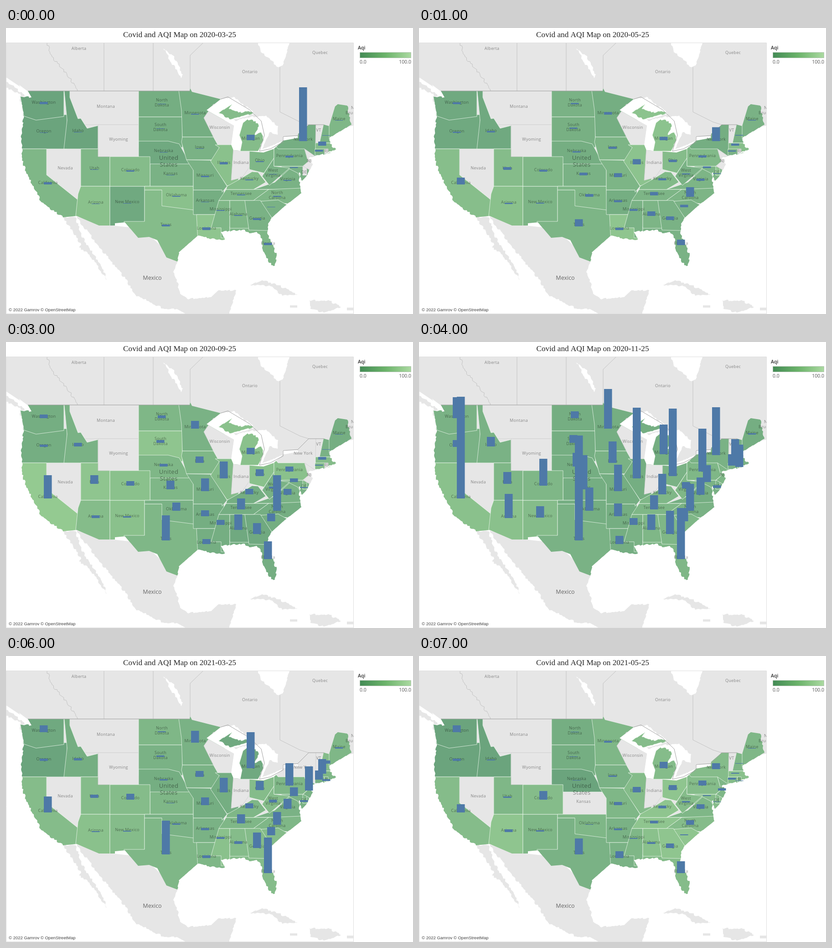
Write an HTML page with a canvas that moves like this. It is 893x627 px and loops after 8 s.

```html
<!DOCTYPE html>
<html lang="en">
<head>
<meta charset="utf-8">
<title>Covid and AQI Map</title>
<style>
html, body { margin: 0; width: 100%; height: 100%; overflow: hidden; background: #fff; }
canvas { display: block; }
</style>
</head>
<body>
<canvas id="stage" width="893" height="627"></canvas>
<script>
const ctx = document.getElementById('stage').getContext('2d');
const SANS = '"Open Sans", sans-serif', LAND = '#e6e6e6', INK = 'rgba(0,0,0,.42)';

const line = points => new Path2D('M' + points);
const area = points => new Path2D('M' + points + 'z');
const box = corners => {
  const [l, t, r, b] = corners.split(' ');
  return new Path2D(`M${l} ${t}H${r}V${b}H${l}z`);
};

// Adds small seeded bends between the given points of a coast.
function rough(points) {
  const p = points.split(' ').map(Number), out = [];
  for (let i = 0; i + 3 < p.length; i += 2) {
    const dx = p[i + 2] - p[i], dy = p[i + 3] - p[i + 1];
    const parts = Math.ceil(Math.hypot(dx, dy) / 4);
    for (let k = 0; k < parts; k++) {
      const bend = k && 1.5 * Math.sin(p[i] * 7 + p[i + 1] * 3 + k * k * 5);
      out.push(p[i] + dx * k / parts + bend, p[i + 1] + dy * k / parts - bend);
    }
  }
  return [...out, ...p.slice(-2)].join(' ');
}

const pacific = rough('56 152 30 149 39 193 33 240 37 297 58 345 78 382 92 392 125 415');
const southWest = '155 412 204 433 239 433 239 428 261 426 290 460 314 458 332 465 352 503 376 512';
const gulf = rough('376 512 379 492 421 455 445 461 480 464 471 447 520 442 534 450 550 447 562 462 563 485 582 520 590 521 594 498 573 450 575 430');
const atlantic = rough('575 430 583 416 612 390 648 362 641 312 650 335 659 325 673 298 664 284 713 273 700 275 724 266 711 254 710 240 758 212 748 170');
const north = '728 167 722 172 709 215 698 212 664 212 641 232 640 241 608 247 588 265 565 273 499 268 494 256 500 214 440 180 471 156 408 140 404 132 403 138 48 138';
const country = area([pacific, southWest, gulf, atlantic, north].join(' '));

// Later states cover the overlap of earlier ones; the country outline cuts the coasts.
const states = [];
function state(name, x, base, path, levels = '', heights = '', first) {
  const [jul, sep, nov, mar, may] = heights.split(' ').map(Number);
  const start = first ?? Math.round(1 + jul / 20);
  const [l0, l2, l3, l4, l6, l7] = levels;
  const between = (a, b) => a === '-' ? b : b === '-' ? a : (+a + +b) / 2;
  states.push({
    name, x, base, path,
    heights: [start, 1 + (start + sep) / 4, jul, sep, nov, (nov + mar) / 2, mar, may],
    levels: levels ? [l0, between(l0, l2), l2, l3, l4, between(l4, l6), l6, l7] : [],
  });
}

state('Montana', 219, 176, box('140 138 291 212'));
state('Nevada', 130, 311, box('89 265 164 377'));
state('Oregon', 83, 230, box('28 190 134 265'), '022300', '4 5 15 5 5');
state('Washington', 83, 167, area('28 130 127 130 127 194 66 202 39 193'), '022310', '11 8 46 15 15', 5);
state('Idaho', 158, 229, area('127 130 140 130 140 152 158 199 164 198 178 220 202 214 202 265 127 265 134 202'), '023320', '7 8 21 5 2');
state('California', 92, 343, area('28 265 89 265 89 322 158 377 150 440 28 440'), '478655', '139 51 223 35 18', 5);
state('Utah', 194, 311, box('164 265 228 347'), '467454', '8 19 26 7 3');
state('Wyoming', 247, 248, box('202 212 291 282'));
state('Arizona', 197, 386, area('164 347 228 347 228 440 150 440 158 364'), '665667', '50 6 53 2 6', 1);
state('New Mexico', 266, 385, box('228 347 304 440'), '166554', '4 3 25 2 3');
state('North|Dakota', 342, 167, box('291 130 387 195'), '244242', '2 6 15 2 1');
state('South|Dakota', 339, 221, box('291 195 387 262'), '237232', '1 6 17 3 1');
state('Kansas', 361, 323, box('316 290 411 347'), '33424-', '1 19 75 1 0');
state('Nebraska', 346, 273, area('291 248 356 248 380 254 404 298 291 298'), '134220', '4 6 30 3 1');
state('Colorado', 273, 315, box('228 282 316 347'), '536455', '11 10 59 13 19', 3);
state('Texas', 351, 435, area('259 424 304 424 304 355 418 355 424 440 421 520 259 520'), '524343', '96 55 230 74 35', 4);
state('Oklahoma', 374, 370, area('304 347 411 347 412 399 342 390 342 355 304 355'), '623234', '13 18 51 3 1');
state('Minnesota', 415, 190, area('378 130 480 130 480 239 387 239 385 180'), '223234', '12 17 87 26 4');
state('Wisconsin', 469, 222, area('455 167 434 197 455 239 459 256 510 256 510 170'));
state('Iowa', 425, 265, area('387 239 455 239 468 262 456 289 396 289 385 250'), '344333', '6 14 47 13 3');
state('Arkansas', 437, 382, box('411 355 478 409'), '222233', '5 13 28 5 4');
state('Missouri', 437, 327, area('396 289 449 290 485 347 474 360 474 355 411 355 411 312'), '343224', '16 28 58 17 7', 3);
state('Illinois', 478, 299, area('459 256 510 256 510 340 485 346 449 292 468 262'), '675225', '20 37 155 32 12', 5);
state('Louisiana', 440, 443, area('418 409 460 409 490 470 421 470'), '7-2243', '0 11 18 6 15', 6);
state('Mississippi', 471, 401, area('467 378 491 378 491 460 472 460 472 438 450 438'), '422364', '21 11 15 4 2');
state('Florida', 575, 476, box('491 435 600 530'), '422455', '166 39 112 78 26', 5);
state('Alabama', 510, 412, box('491 378 533 439'), '431456', '29 34 34 6 4');
state('', 632, 307, box('604 303 665 335'), '343335', '17 8 37 19 2');
state('Virginia', 618, 335, area('543 354 590 338 622 309 640 318 660 353'), '343234', '17 13 38 22 10');
state('North|Carolina', 595, 370, area('576 354 670 350 670 390 543 378'), '432345', '29 78 59 28 10');
state('', 582, 393, area('556 380 597 377 630 395 590 425'), '332457', '19 17 29 18 2', 1);
state('Georgia', 551, 421, area('524 378 558 378 583 416 576 444 533 443'), '331457', '59 24 51 34 10');
state('Tennessee', 516, 367, area('483 354 576 354 543 378 467 378'), '432447', '25 24 31 20 6');
state('Ohio', 557, 294, area('534 262 588 262 588 285 566 318 534 310'), '466357', '19 15 148 20 11');
state('Indiana', 516, 299, area('499 262 534 262 534 305 518 328 494 334'));
state('Kentucky', 534, 334, area('485 347 512 332 540 315 553 316 570 338 543 354 483 354'), '542447', '11 12 45 11 6');
state('West|Virginia', 586, 321, area('588 285 588 303 622 307 578 345 562 325'), '333455', '2 4 14 6 3');
state('New York', 652, 248, area('588 265 597 235 660 205 690 205 690 275 720 270 720 290 672 290'), '2--3-5', '0 0 105 0 13', 118);
state('Pennsylvania', 622, 284, area('588 255 597 265 655 265 663 293 651 303 588 303'), '366445', '13 11 94 49 11', 4);
state('DE', 654, 320, box('651 303 660 323'), '-75345', '2 2 6 4 1', 0);
state('NJ', 665, 295, area('655 265 680 282 675 316 652 303 663 293'), '---434', '0 0 0 53 5', 0);
state('VT', 686, 228, area('680 205 698 205 688 252 679 252'));
state('', 703, 236, area('698 205 709 205 712 252 688 252'), '323354', '1 1 6 7 1');
state('', 694, 258, box('679 252 730 275'), '565346', '4 6 45 32 2', 9);
state('', 687, 271, box('678 265 699 279'), '3-5335', '0 2 25 20 4', 4);
state('RI', 703, 274, box('699 265 707 276'), '---344', '0 0 49 4 1', 0);
state('Maine', 731, 203, box('709 160 762 244'), '422244', '1 1 3 3 1');

const peninsulas = new Path2D();
peninsulas.addPath(area(rough('530 200 548 204 555 215 546 234 560 229 565 245 553 270')+ ' 514 270 518 250 512 235 520 208'));
peninsulas.addPath(area(rough('466 186 496 167 489 177 510 185 534 183 545 187 505 197 490 200 466 186')));
state('Michigan', 537, 246, peninsulas, '586215', '4 14 65 79 14', 12);
const michigan = states.at(-1);

const land = [
  area('0 33 762 33 762 214 640 240 560 266 500 200 400 140 48 140 0 108'),
  area(rough('0 118 22 132 44 152 0 131')),
  area('155 413 204 430 300 440 376 512 ' + rough('376 512 367 535 385 585 398 594 450 590 466 575 505 575 490 627')
    + ' 395 627 ' + rough('375 616 345 615 284 585 262 550 208 484 157 418')),
  area(rough('125 415 153 415 165 455 205 515 222 552 183 497 160 481 165 475 125 415')),
  area(rough('536 563 562 553 598 564 640 585 606 587 580 566 536 563')),
  area(rough('666 597 710 598 735 612 697 624 668 616 666 597')),
  box('623 608 639 613'), box('748 613 762 619'),
];
const lakes = [
  area(rough('553 33 562 55 598 86 607 82 622 33')),
  area(rough('345 45 366 60 388 102 384 110 345 45')),
  area(rough('440 182 471 156 502 152 546 188 505 200 440 182')),
  area(rough('497 205 530 196 571 192 597 215 596 234 579 228 560 270 500 270 497 205')),
  area(rough('553 271 608 247 598 262 560 276 553 271')),
  box('607 237 641 246'),
  area('28 124 56 145 50 156 28 124'),
];
const provinces = [
  line(rough('90 33 101 63 140 110 157 138')), line('215 33V138'), line('323 33V138'),
  line('404 132 404 60 432 33'), line('601 86V184L645 206 664 212'),
];
const border = [line('48 138H403'), line('471 156 487 151 534 179 560 204 567 235 556 270 580 265 608 250 608 238 640 236 664 212 698 212')];

function text(str, x, y, font, color, align = 'center') {
  ctx.font = font;
  ctx.fillStyle = color;
  ctx.textAlign = align;
  ctx.textBaseline = 'middle';
  ctx.fillText(str, x, y);
}

function paint(paths, fill, stroke, width = 1) {
  ctx.fillStyle = fill;
  ctx.strokeStyle = stroke;
  ctx.lineWidth = width;
  for (const p of paths) {
    if (fill) ctx.fill(p);
    if (stroke) ctx.stroke(p);
  }
}

function green(level) {
  const mix = (a, b) => Math.round(a + (b - a) * level / 9);
  return `rgb(${mix(107, 153)},${mix(164, 207)},${mix(125, 148)})`;
}

function drawMap(step) {
  const hasData = s => s.levels.length > 0 && s.levels[step] !== '-';
  const paintState = s => hasData(s)
    ? paint([s.path], green(s.levels[step]), 'rgba(240,250,240,.75)')
    : paint([s.path], LAND, '#cfcfcf', 0.8);

  ctx.save();
  ctx.beginPath();
  ctx.rect(0, 33, 762, 593);
  ctx.clip();
  paint(land, LAND);
  paint(lakes, '#fff');
  paint(provinces, null, '#b9b9b9', 0.8);
  paint([country], LAND);
  ctx.save();
  ctx.clip(country);
  states.forEach(s => s === michigan || paintState(s));
  ctx.restore();
  paintState(michigan);
  paint(border, null, '#a0a0a0');

  const small = '9px ' + SANS, large = '13px ' + SANS;
  ctx.letterSpacing = '0.3px';
  text('Alberta', 160, 46, small, INK);
  text('Ontario', 535, 97, small, INK);
  text('Quebec', 689, 55, small, INK);
  text('New', 757, 176, small, INK, 'left');
  text('Brunswick', 745, 187, small, INK, 'left');
  for (const { name, x, base } of states) {
    const rows = name.split('|');
    rows.forEach((row, i) => text(row, x, base - 3 + (i - (rows.length - 1) / 2) * 11, small, INK));
  }
  text('United', 357, 286, large, INK);
  text('States', 357, 301, large, INK);
  ctx.letterSpacing = '0px';
  text('Mexico', 321, 549, '12.5px ' + SANS, '#666');

  ctx.fillStyle = '#4e79a7';
  for (const s of states.filter(hasData)) {
    ctx.fillRect(s.x - 9, s.base - s.heights[step], 17.5, s.heights[step]);
  }
  ctx.restore();
  paint([box('0.5 32.5 762.5 626.5')], null, '#dedede');
}

function drawLegend() {
  const ramp = ctx.createLinearGradient(776, 0, 888, 0);
  ['#438b55', '#6bb36a', '#aad9a0'].forEach((c, i) => ramp.addColorStop(i / 2, c));
  paint([box('776.5 53.5 888.5 65.5')], ramp, '#b5c5b5');
  text('Aqi', 772, 44, '600 10.5px ' + SANS, '#333', 'left');
  text('0.0', 776, 75, '10.5px ' + SANS, '#555', 'left');
  text('100.0', 889, 75, '10.5px ' + SANS, '#555', 'right');
}

function draw() {
  const step = Math.floor(performance.now() / 1000) % 8, month = 2 + 2 * step;
  const date = `${2020 + Math.floor(month / 12)}-${String(month % 12 + 1).padStart(2, '0')}-25`;
  ctx.fillStyle = '#fff';
  ctx.fillRect(0, 0, 893, 627);
  drawMap(step);
  drawLegend();
  text('Covid and AQI Map on ' + date, 381, 15, '17.2px "Liberation Serif", serif', '#222');
  text('© 2022 Gamrov © OpenStreetMap', 6, 618, '9.5px "Liberation Sans", sans-serif', '#444', 'left');
  requestAnimationFrame(draw);
}
draw();
</script>
</body>
</html>
```
